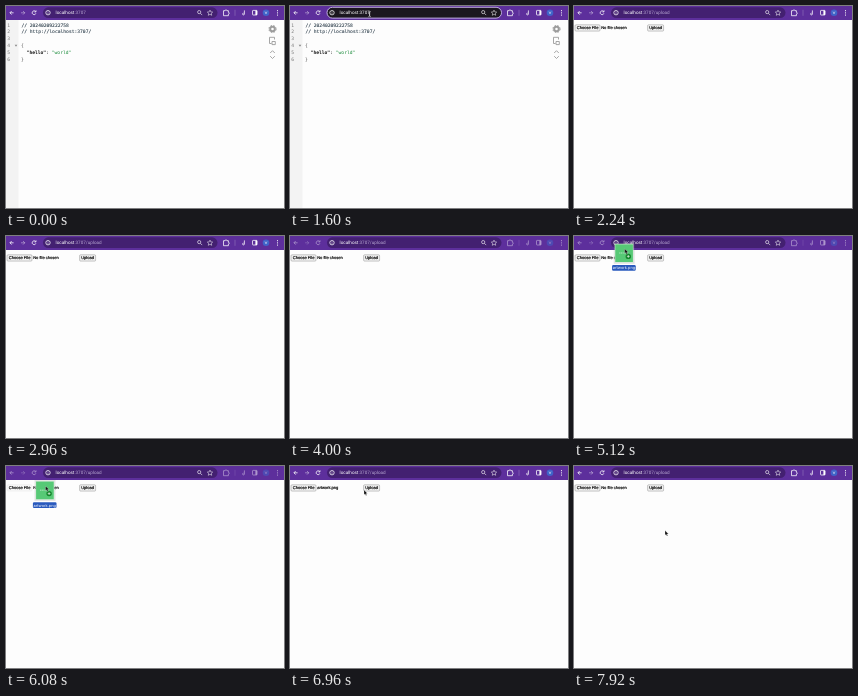
Write an HTML page that moves like this. It is 278 px wide and 202 px high and loops after 8 s.

```html
<!DOCTYPE html>
<html lang="en">
<head>
<meta charset="utf-8">
<title>File upload</title>
<style>
html, body { margin: 0; width: 100%; height: 100%; overflow: hidden; background: #fdfdfd; }
svg { display: block; width: 100vw; height: 100vh; text-rendering: geometricPrecision; }
.url { font: 4.6px Roboto, sans-serif; fill: #fff; }
.json text { font: 4.65px "DejaVu Sans Mono", monospace; white-space: pre; }
.form text { font: 4.05px "Liberation Sans", sans-serif; stroke: #000; stroke-width: .16; }
.form rect { fill: #f0f0f0; stroke: #777; stroke-width: .4; }
.icons { fill: none; stroke: #fff; stroke-width: .75; }
.tools { fill: none; stroke: #9c9c9c; stroke-width: .9; }
</style>
</head>
<body>
<svg viewBox="0 0 278 202">
  <rect width="278" height="202" fill="#fdfdfd"/>

  <g id="json" class="json">
    <rect y="13" width="12.5" height="189" fill="#f3f3f3"/>
    <g id="numbers" fill="#777"></g>
    <path d="M8.7 38.8h2.6l-1.3 1.9z" fill="#888"/>
    <g fill="#3c4c58" stroke="#3c4c58" stroke-width=".12">
      <text x="15.4" y="20.6">// 20240209222758</text>
      <text x="15.4" y="27.4">// http://localhost:3707/</text>
    </g>
    <text x="15" y="41.1" fill="#555">{</text>
    <text x="20.6" y="47.9"><tspan font-weight="bold" fill="#111">"hello"</tspan>: <tspan fill="#178a38">"world"</tspan></text>
    <text x="15" y="54.7" fill="#555">}</text>
    <g class="tools">
      <circle cx="266.5" cy="23" r="2.3" stroke-width="2"/>
      <circle cx="266.5" cy="23" r="3.6" stroke-width="1" stroke-dasharray="1.5 1.4"/>
      <path d="M268.5 33.5v-2.2h-5v6.2h2M266 35.5h3.3v3.1h-3.3z"/>
      <path d="M264.2 47l2.3-2.3 2.3 2.3M264.2 50.2l2.3 2.3 2.3-2.3"/>
    </g>
  </g>

  <g id="form" class="form">
    <rect id="choose" x="1" y="18.8" width="25" height="6.3" rx="1"/>
    <text x="2.8" y="23.4">Choose File</text>
    <text id="file" x="27.2" y="23.4"></text>
    <rect id="upload" x="73.6" y="18.8" width="16" height="6.3" rx="1"/>
    <text x="75.2" y="23.4">Upload</text>
  </g>

  <rect width="278" height="14" fill="#5d2f9c"/>
  <rect id="pill" x="37" y="1.3" width="174.5" height="10.8" rx="5.4" stroke-width=".9"/>
  <g id="bar" class="icons">
    <path d="M7.6 6.8H4M5.7 5L3.9 6.8l1.8 1.8"/>
    <path d="M15 6.8h3.8M17 5l1.8 1.8L17 8.6" opacity=".5"/>
    <path d="M29.6 5.6a1.9 1.9 0 1 0 .3 1.7M30 4.3v1.6h-1.6"/>
    <path d="M217.5 4.7h1.6a.9.9 0 0 1 1.8 0h1.5v1.6a.9.9 0 0 1 0 1.8v1.6h-4.9z"/>
    <path d="M229 3.8v6" opacity=".4" stroke-width=".5"/>
    <path d="M238.4 4.4v3.6a.9.9 0 1 1-.9-.9"/>
    <rect x="246.5" y="4.4" width="4.6" height="4.6" rx=".6"/>
    <path d="M250.2 4.4v4.6" stroke-width="1.6"/>
    <circle cx="260" cy="6.7" r="3.3" fill="#3f63c8" stroke="none"/>
    <path d="M259 5.6l1 2.2 1-2.2" stroke-width=".5"/>
    <path d="M271.5 4.2v5.5" stroke-width="1" stroke-dasharray="1 1.2"/>
  </g>
  <g class="icons">
    <circle cx="42" cy="6.7" r="2.2"/>
    <path d="M42 6.3v1.6M42 5.2v.5" stroke-width=".5"/>
    <circle cx="193.2" cy="6.1" r="1.6" stroke-width=".6"/>
    <path d="M194.4 7.3l1.8 1.8" stroke-width=".6"/>
    <path d="M204 4.1l.8 1.8 1.9.2-1.4 1.3.4 1.9-1.7-1-1.7 1 .4-1.9-1.4-1.3 1.9-.2z" stroke-width=".5"/>
  </g>
  <text class="url" x="49.6" y="8.4">localhost<tspan id="path"></tspan></text>

  <g id="drag">
    <rect x="-1" y="-1" width="21" height="21" fill="#888" opacity=".2"/>
    <rect width="18.8" height="18.8" fill="#cfe6d5"/>
    <rect x=".6" y=".6" width="17.6" height="17.6" fill="#57c976"/>
    <path d="M4.5 9.2h6" stroke="#d5f3dc" stroke-width=".7" stroke-dasharray="1.2 .5"/>
    <rect x="-2.6" y="21.3" width="23.6" height="5.6" rx="1.2" fill="#2859bd"/>
    <text x="9.2" y="25.5" text-anchor="middle" fill="#fff" font-size="3.9" font-family="Inter, sans-serif">artwork.png</text>
    <circle cx="13.6" cy="12.6" r="2.7" fill="#14852b"/>
    <path d="M12.2 12.6h2.8M13.6 11.2v2.8" stroke="#fff" stroke-width=".6"/>
  </g>
  <path id="arrow" d="M0 0v4.8l1.1-1 .8 1.8.9-.4-.8-1.7h1.5z" fill="#111" stroke="#fff" stroke-width=".25"/>
  <path id="beam" d="M-1.2-2.4q1.2 0 1.2.8v3.4q0 .8-1.2.8M1.2-2.4q-1.2 0-1.2.8v3.4q0 .8 1.2.8" fill="none" stroke="#fff" stroke-width=".5"/>
</svg>
<script>
const $ = id => document.getElementById(id);
const LOOP = 8000, STEP = 80;
const CLICK_URL = 720, TYPE = 1600, LOAD = 2240, BLUR = 3600, GRAB = 4160, DROP = 6240, SUBMIT = 7360;

// Keys are [time, x, y]
const beamPath = [[320, 96, 12], [640, 79.6, 8]];
const dragPath = [[GRAB, 110, 76], [4320, 96, 60], [4480, 78.5, 43.5], [4720, 53, 18], [4960, 40, 7],
  [5120, 40.7, 7.8], [5440, 34, 13], [5840, 29.5, 15]];
const arrowPath = [[DROP, 40, 21], [6400, 42, 23], [6800, 66, 26], [7120, 82, 22], [SUBMIT, 82, 22],
  [7680, 124, 83], [7920, 91, 64.5]];

const between = (t, a, b) => t >= a && t < b;

function at(keys, t) {
  if (t <= keys[0][0]) return keys[0].slice(1);
  const i = keys.findIndex(k => k[0] > t);
  if (i < 0) return keys.at(-1).slice(1);
  const [a, b] = [keys[i - 1], keys[i]];
  const u = (t - a[0]) / (b[0] - a[0]);
  const e = u * u * (3 - 2 * u) * .4 + u * .6;
  return [1, 2].map(n => a[n] + (b[n] - a[n]) * e);
}

function show(id, on) { $(id).style.display = on ? '' : 'none'; }

function place(id, on, [x, y]) {
  show(id, on);
  $(id).setAttribute('transform', `translate(${x} ${y})`);
}

function draw(t) {
  const loaded = t >= LOAD, focused = between(t, CLICK_URL, LOAD);
  const typed = Math.max(0, Math.min(7, Math.floor((t - TYPE) / STEP)));
  show('json', !loaded);
  show('form', loaded);

  $('path').textContent = ':3707' + '/upload'.slice(0, typed);
  $('path').style.fill = focused ? '#fff' : '#b9a8d3';
  $('pill').style.fill = focused ? '#1b171f' : '#432071';
  $('pill').style.stroke = focused ? '#cdbcec' : 'none';
  $('bar').style.opacity = between(t, BLUR, DROP) ? .5 : 1;

  $('file').textContent = between(t, DROP, SUBMIT) ? 'artwork.png' : 'No file chosen';
  const over = between(t, 5840, DROP);
  $('choose').style.fill = over ? '#f8f8f8' : '';
  $('choose').style.stroke = over ? '#e4e4e4' : '';
  $('upload').style.fill = between(t, 7200, SUBMIT) ? '#d4d4d4' : '';

  const drag = at(dragPath, t), dragging = between(t, GRAB, DROP);
  place('drag', dragging, drag);
  place('arrow', t >= GRAB, dragging ? [drag[0] + 10, drag[1] + 5] : at(arrowPath, t));
  place('beam', between(t, 320, TYPE + STEP), at(beamPath, t));
}

for (let i = 0; i < 6; i++)
  $('numbers').innerHTML += `<text x="1.2" y="${20.6 + i * 6.82}">${i + 1}</text>`;

const start = performance.now();
function tick(now) {
  const t = Math.max(0, now - start) % LOOP;
  draw(Math.floor(t / STEP) * STEP);
  requestAnimationFrame(tick);
}
draw(0);
requestAnimationFrame(tick);
</script>
</body>
</html>
```
